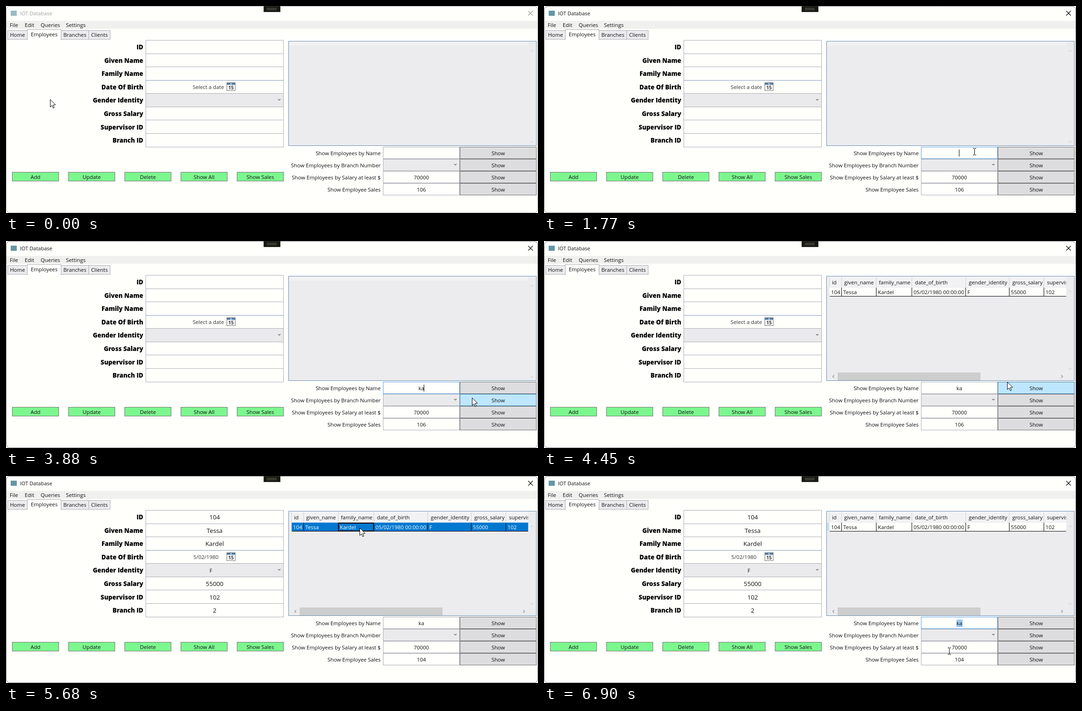
Animation, 1136 px wide and 444 px high, one loop 8 s. Source, as an HTML page with a canvas:

```html
<!DOCTYPE html>
<html lang="en">
<head>
<meta charset="utf-8">
<title>IOT Database</title>
<style>
html, body { margin: 0; width: 100%; height: 100%; overflow: hidden; background: #fff; }
canvas { display: block; }
</style>
</head>
<body>
<canvas id="stage" width="1136" height="444"></canvas>
<script>
const ctx = document.getElementById('stage').getContext('2d');
const LOOP = 8000;
const HOVER_LAG = 60;
const SMALL = 11.35, LARGE = 13.25;
const PAPER = '#fffffc', PANEL = '#ececef', COMBO = '#eaeaec', INK = '#121214';
const EDGE = '#abadb3', HOVER_EDGE = '#7eb4ea', FOCUS_EDGE = '#569de5';

const EVENTS = {
  activate: 1690, caret: 1730, typeK: 2820, typeA: 2960,
  query: 4080, pickRow: 5380, press: 6600, selectText: 6740
};

// Pointer stops: time, x, y
const PATH = [
  [0, 94, 200], [30, 94, 200], [340, 872, 378], [920, 872, 378],
  [1190, 893, 350], [1740, 919, 312], [2010, 919, 312],
  [2350, 970, 384], [3400, 970, 384], [4080, 1002, 316],
  [4450, 989, 302], [5300, 758, 113], [5680, 755, 111],
  [6600, 899, 317], [6900, 865, 375], [LOOP, 865, 375]
];

const person = {
  id: '104', given: 'Tessa', family: 'Kardel', born: '5/02/1980',
  gender: 'F', salary: '55000', supervisor: '102', branch: '2'
};
const FORM = [
  ['ID', 'id'], ['Given Name', 'given'], ['Family Name', 'family'], ['Date Of Birth', 'born'],
  ['Gender Identity', 'gender'], ['Gross Salary', 'salary'], ['Supervisor ID', 'supervisor'], ['Branch ID', 'branch']
];
// Column title, left edge, value
const COLUMNS = [
  ['id', 610, person.id], ['given_name', 636, person.given], ['family_name', 710, person.family],
  ['date_of_birth', 786, '05/02/1980 00:00:00'], ['gender_identity', 901, person.gender],
  ['gross_salary', 994, person.salary], ['supervisor_id', 1068, person.supervisor]
];

// Speed along one axis at a stop: zero at turning points and beside pauses
function speedAt(i, axis) {
  if (i === 0 || i === PATH.length - 1) return 0;
  const slope = k => (PATH[k + 1][axis] - PATH[k][axis]) / (PATH[k + 1][0] - PATH[k][0]);
  const before = slope(i - 1), after = slope(i);
  return before * after > 0 ? 2 * before * after / (before + after) : 0;
}

function pointerAt(time) {
  const next = PATH.findIndex(stop => stop[0] > time), i = next - 1;
  const span = PATH[next][0] - PATH[i][0], p = (time - PATH[i][0]) / span, q = 1 - p;
  const along = axis => Math.round(
    PATH[i][axis] * q * q * (1 + 2 * p) + PATH[next][axis] * p * p * (3 - 2 * p) +
    span * p * q * (speedAt(i, axis) * q - speedAt(next, axis) * p));
  return { x: along(1), y: along(2) };
}

const inside = (p, x, y, w, h) => p.x >= x && p.x < x + w && p.y >= y && p.y < y + h;

function fill(x, y, w, h, color) {
  ctx.fillStyle = color;
  ctx.fillRect(x, y, w, h);
}

function box(x, y, w, h, color, edge = EDGE) {
  fill(x, y, w, h, color);
  ctx.strokeStyle = edge;
  ctx.lineWidth = 1;
  ctx.strokeRect(x + .5, y + .5, w - 1, h - 1);
}

function text(str, x, y, { align = 'left', size = SMALL, color = INK, weight = 400 } = {}) {
  ctx.font = `${weight} ${size}px "Open Sans", "Noto Sans", sans-serif`;
  ctx.textAlign = align;
  ctx.fillStyle = color;
  ctx.fillText(str, x, y);
}

function line(points, color, width = 1) {
  ctx.beginPath();
  points.forEach(([x, y]) => ctx.lineTo(x, y));
  ctx.strokeStyle = color;
  ctx.lineWidth = width;
  ctx.stroke();
}

// An arrow head around (x, y) pointing along (dx, dy)
function chevron(x, y, dx, dy, size, color) {
  line([
    [x - dx * size / 2 - dy * size, y - dy * size / 2 - dx * size],
    [x + dx * size / 2, y + dy * size / 2],
    [x - dx * size / 2 + dy * size, y - dy * size / 2 + dx * size]
  ], color, 1.1);
}

function drawWindow(active) {
  fill(0, 0, 1136, 444, '#fff');
  ctx.beginPath();
  ctx.roundRect(.5, .5, 1135, 443, 8);
  ctx.fillStyle = PAPER;
  ctx.fill();
  fill(1, 32, 1134, 17, '#f0f0ef');
  ctx.strokeStyle = active ? '#77777a' : '#a4a4a8';
  ctx.lineWidth = 1;
  ctx.stroke();

  const titleInk = active ? INK : '#a0a0a0';
  fill(10, 10, 13, 11, active ? '#6596a4' : '#9cbac2');
  text('IOT Database', 30, 20, { size: 11, color: titleInk });
  line([[1115, 10.5], [1125, 20.5]], titleInk, 1.2);
  line([[1125, 10.5], [1115, 20.5]], titleInk, 1.2);

  box(550, 0, 36, 13, '#181812', '#33332a');
  for (let y = 4; y < 10; y += 2) fill(557, y, 21, 1, '#55554c');

  [['File', 8], ['Edit', 40], ['Queries', 74], ['Settings', 128]].forEach(([name, x]) => text(name, x, 45));
  [['Home', 3, 43], ['Branches', 117, 60], ['Clients', 176, 47]].forEach(([name, x, w]) => {
    box(x, 52, w, 20, PANEL);
    text(name, x + w / 2, 66, { align: 'center' });
  });
  box(45, 50, 73, 23, PAPER);
  fill(46, 72, 71, 1, PAPER);
  text('Employees', 81.5, 65, { align: 'center' });
}

function drawCalendar(x, y) {
  box(x, y, 19, 18, '#f7f7f7', '#77777c');
  fill(x + 1, y + 1, 17, 4, '#557fa8');
  fill(x + 8, y + 2, 3, 2, '#e8eef4');
  text('15', x + 9.5, y + 15, { align: 'center', size: 10, weight: 700, color: '#404044' });
}

function drawForm(filled) {
  FORM.forEach(([label, key], row) => {
    const top = Math.round(73 + row * 28.55), mid = Math.round(88 + row * 28.6);
    text(label, 293, mid + 5, { align: 'right', size: 13.2, weight: 800, color: '#000' });
    box(298, top, 295, 30, key === 'gender' ? COMBO : PAPER);
    if (key === 'born') {
      fill(298, top, 295, 1, '#7f9ab8');
      text(filled ? person.born : 'Select a date', filled ? 400 : 398.5, mid + 4, { color: '#333' });
      drawCalendar(471, 164);
    } else if (filled) {
      text(person[key], 445.5 - (key === 'gender' ? 8 : 0), mid + 5, {
        align: 'center', size: key === 'gender' ? SMALL : LARGE
      });
    }
    if (key === 'gender') chevron(583.5, 201, 0, 1, 2.5, '#606060');
  });
  ['Add', 'Update', 'Delete', 'Show All', 'Show Sales'].forEach((name, i) => {
    box(13 + i * 120, 356, 100, 20, '#7cf78e', '#707070');
    text(name, 63 + i * 120, 371, { align: 'center' });
  });
}

function drawGrid(loaded, selected, revisited) {
  box(603, 75, 530, 225, PANEL, '#688caf');
  const faint = '#d2d2d6';
  chevron(1123.5, loaded ? 108 : 96, 0, -1, 3, faint);
  chevron(1123.5, loaded ? 274 : 291, 0, 1, 3, faint);
  if (!loaded) {
    fill(604, 76, 511, 9, '#f2f2f4');
    return;
  }
  ctx.save();
  ctx.beginPath();
  ctx.rect(604, 76, 511, 205);
  ctx.clip();
  fill(604, 76, 511, 23, '#f2f2f4');
  fill(610, 100, 506, 18, selected ? '#0078d0' : PAPER);
  fill(610, 118, 506, 1, '#000');
  if (revisited) fill(604, 100, 5, 18, '#c9e2f2');
  COLUMNS.forEach(([name, x, value], i) => {
    fill(x - 1, 78, 1, 20, '#cfcfd2');
    if (i) fill(x - 1, 100, 1, 18, '#000');
    text(name, x + 5 + (i > 2), 93);
    text(value, x + 3, 114, { color: selected ? '#fff' : INK });
  });
  if (selected) {
    ctx.strokeStyle = '#000';
    ctx.lineWidth = 2;
    ctx.strokeRect(710, 101, 75, 17);
  }
  ctx.restore();
  fill(627, 282, 305, 17, '#cdcdcd');
  chevron(618, 290.5, -1, 0, 3, '#8a8a8a');
  chevron(1106, 290.5, 1, 0, 3, '#8a8a8a');
}

function drawQueries(time, hoverPoint, filled) {
  const focused = time >= EVENTS.activate && time < EVENTS.query || time >= EVENTS.press;
  const dragging = time >= EVENTS.press;
  const name = time < EVENTS.typeK ? '' : time < EVENTS.typeA ? 'k' : 'ka';
  const rows = [
    ['Show Employees by Name', name], ['Show Employees by Branch Number', ''],
    ['Show Employees by Salary at least $', '70000'], ['Show Employee Sales', filled ? '104' : '106']
  ];
  rows.forEach(([label, value], i) => {
    const y = 302 + i * 26, isCombo = i === 1;
    const overField = !dragging && inside(hoverPoint, 805, y, 164, 26);
    const overButton = !dragging && inside(hoverPoint, 969, y, 164, 26);
    const edge = i === 0 && focused ? FOCUS_EDGE : overField ? HOVER_EDGE : EDGE;
    text(label, 800, y + 18, { align: 'right' });
    box(805, y, 164, 26, !isCombo ? PAPER : overField ? '#e4f0fc' : COMBO, edge);
    if (i === 0 && time >= EVENTS.selectText) fill(881, 308, 13, 16, '#99c9ef');
    text(value, 887, y + 18, { align: 'center' });
    box(969, y, 164, 26, overButton ? '#bee6fd' : '#dddddf', overButton ? '#3c7fb1' : '#707070');
    text('Show', 1051, y + 18, { align: 'center' });
  });
  chevron(959.5, 340, 0, 1, 2.5, '#606060');

  const caretOn = time >= EVENTS.caret && time < EVENTS.query ||
    dragging && time < EVENTS.selectText;
  if (caretOn) fill(Math.round(886 + name.length * 3.2), 308, 1, 15, '#000');
}

function drawPointer(p, dragging) {
  const overText = dragging || inside(p, 806, 303, 162, 24) || inside(p, 806, 355, 162, 50) ||
    inside(p, 299, 74, 293, 113) || inside(p, 299, 217, 293, 84);
  if (overText) {
    fill(p.x, p.y - 6, 1, 13, '#000');
    [-7, 7].forEach(dy => {
      fill(p.x - 3, p.y + dy, 3, 1, '#000');
      fill(p.x + 1, p.y + dy, 3, 1, '#000');
    });
    return;
  }
  ctx.beginPath();
  [[0, 0], [0, 16], [3.7, 12.7], [6.3, 18.5], [8.7, 17.5], [6.2, 11.8], [11.3, 11.5]]
    .forEach(([x, y]) => ctx.lineTo(p.x + x + .5, p.y + y + .5));
  ctx.closePath();
  ctx.fillStyle = '#fff';
  ctx.fill();
  ctx.strokeStyle = '#000';
  ctx.lineWidth = 1;
  ctx.stroke();
}

function frame() {
  const time = performance.now() % LOOP;
  const dragging = time >= EVENTS.press;
  const filled = time >= EVENTS.pickRow;
  drawWindow(time >= EVENTS.activate);
  drawForm(filled);
  drawGrid(time >= EVENTS.query, filled && !dragging, dragging);
  drawQueries(time, pointerAt(Math.max(0, time - HOVER_LAG)), filled);
  drawPointer(pointerAt(time), dragging);
  requestAnimationFrame(frame);
}
frame();
</script>
</body>
</html>
```
